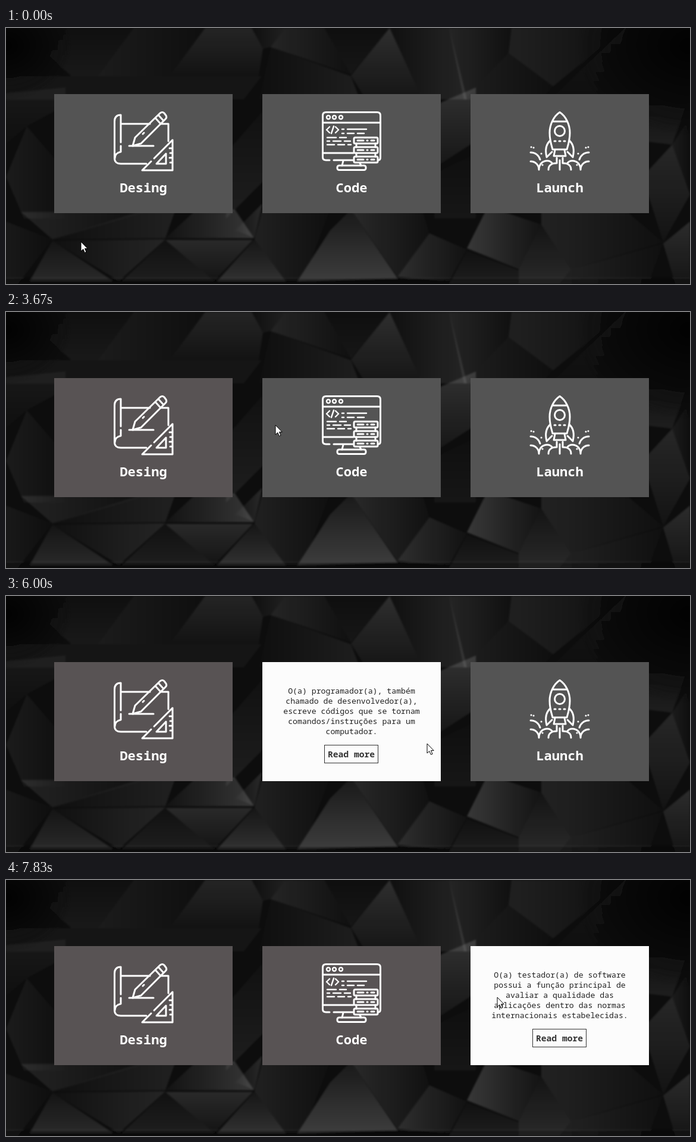
Recreate the animation shown at these times as an HTML page. Size 1150 by 430 pixels, loop 8 s.

```html
<!DOCTYPE html>
<html lang="pt">
<head>
<meta charset="utf-8">
<title>Cards</title>
<style>
html, body { margin: 0; width: 100%; height: 100%; overflow: hidden; background: #0d0d0d; }
svg { display: block; }
text { font-family: "Noto Sans Mono", "DejaVu Sans Mono", monospace; text-anchor: middle; white-space: pre; }
.title { font-size: 22px; font-weight: 700; fill: #fff; }
.line { font-size: 13.2px; fill: #222; }
.label { font-size: 14.67px; font-weight: 700; }
.icon { fill: none; stroke: #fff; stroke-width: 3; stroke-linejoin: round; stroke-linecap: round; }
</style>
</head>
<body>
<svg id="stage" width="1150" height="430" viewBox="0 0 1150 430">
  <defs>
    <linearGradient id="down" x2="0" y2="1"><stop stop-color="#fff"/><stop offset="1" stop-color="#fff" stop-opacity=".25"/></linearGradient>
    <linearGradient id="up" y1="1" x2="0" y2="0"><stop stop-color="#fff"/><stop offset="1" stop-color="#fff" stop-opacity=".25"/></linearGradient>
    <linearGradient id="right"><stop stop-color="#fff"/><stop offset="1" stop-color="#fff" stop-opacity=".15"/></linearGradient>
    <linearGradient id="left" x1="1" x2="0"><stop stop-color="#fff"/><stop offset="1" stop-color="#fff" stop-opacity=".15"/></linearGradient>
    <radialGradient id="shade"><stop stop-opacity=".85"/><stop offset="1" stop-opacity="0"/></radialGradient>
    <filter id="soft" x="0" y="0" width="1" height="1"><feGaussianBlur stdDeviation="1.5"/></filter>
    <g id="halfCloud">
      <path d="M1 69C9 69 15 74 17 81M1 84C9 84 15 90 15 98M15 98C15 89 21 83 29 83C33 83 36 85 38 88M31 98C31 91 36 87 45 87V78"/>
      <path d="M34 49C27 55 25 64 28 77L37 68M41 50h2M6 61h.1M2 60h.1M21 90h.1M19 71h.1"/>
    </g>
  </defs>

  <rect width="1150" height="430" fill="#0d0d0d"/>
  <g filter="url(#soft)">
    <path d="M22 0H215L155 81H110Z" fill="url(#up)" opacity=".05"/>
    <path d="M215 0H335L275 81H155Z" fill="url(#right)" opacity=".06"/>
    <path d="M335 0H413L432 35L425 81H275Z" fill="url(#down)" opacity=".1"/>
    <path d="M0 81H430L400 120H0Z" fill="#fff" opacity=".035"/>
    <path d="M413 0H470L445 32L432 35Z" fill="url(#left)" opacity=".08"/>
    <path d="M470 0H535L580 78L445 32Z" fill="url(#right)" opacity=".1"/>
    <path d="M445 32L580 81L595 120H425Z" fill="url(#left)" opacity=".07"/>
    <path d="M535 0H645L580 78Z" fill="url(#up)" opacity=".04"/>
    <path d="M645 0L580 80L605 120H700Z" fill="url(#down)" opacity=".14"/>
    <path d="M645 0H745L775 120H700Z" fill="url(#left)" opacity=".1"/>
    <path d="M745 0H850L845 42L770 120Z" fill="url(#right)" opacity=".1"/>
    <path d="M845 42L920 98L900 120H770Z" fill="url(#right)" opacity=".07"/>
    <path d="M850 0H1040L920 98L845 42Z" fill="url(#right)" opacity=".08"/>
    <path d="M1040 0H1110L1090 120H915Z" fill="url(#down)" opacity=".04"/>
    <path d="M0 110L100 100V130L35 165L0 195Z" fill="url(#down)" opacity=".05"/>
    <path d="M35 165L100 240V320H30L0 250Z" fill="url(#right)" opacity=".06"/>
    <path d="M370 210L440 130V250L370 320Z" fill="url(#up)" opacity=".07"/>
    <path d="M720 130L790 100V190L720 235Z" fill="url(#down)" opacity=".15"/>
    <path d="M720 245L790 210V320H720Z" fill="url(#up)" opacity=".04"/>
    <path d="M1070 111H1150L1120 196L1070 190Z" fill="url(#up)" opacity=".07"/>
    <path d="M1120 196L1150 280L1105 360L1070 250Z" fill="url(#down)" opacity=".11"/>
    <path d="M1120 196L1150 150V280Z" fill="url(#right)" opacity=".06"/>
    <path d="M25 309H235L78 355Z" fill="url(#right)" opacity=".09"/>
    <path d="M0 325L78 355L20 430H0Z" fill="url(#right)" opacity=".05"/>
    <path d="M78 357L180 425H40Z" fill="url(#up)" opacity=".12"/>
    <path d="M78 355L235 305H285L268 353Z" fill="url(#left)" opacity=".08"/>
    <path d="M78 357L268 355L190 425Z" fill="url(#left)" opacity=".1"/>
    <path d="M268 353L320 305H385L417 353Z" fill="url(#left)" opacity=".17"/>
    <path d="M268 356L415 356L350 425Z" fill="url(#down)" opacity=".12"/>
    <path d="M268 356L350 425H195Z" fill="url(#up)" opacity=".07"/>
    <path d="M385 340L431 295L418 352Z" fill="url(#left)" opacity=".12"/>
    <path d="M418 355L470 425H355Z" fill="url(#up)" opacity=".15"/>
    <path d="M418 355L431 305H545L515 385L490 425H470Z" fill="url(#right)" opacity=".08"/>
    <path d="M580 305L658 420L490 425L545 340Z" fill="url(#up)" opacity=".2"/>
    <path d="M580 305H700L712 345L658 418Z" fill="url(#right)" opacity=".12"/>
    <path d="M658 418L712 345L775 372L745 425Z" fill="url(#right)" opacity=".14"/>
    <path d="M775 370L810 300L900 330L862 405Z" fill="url(#right)" opacity=".18"/>
    <path d="M900 330L900 305H1040L1105 360L950 405Z" fill="url(#right)" opacity=".09"/>
    <path d="M900 330L950 405L930 430H862V405Z" fill="url(#up)" opacity=".12"/>
    <path d="M775 374L862 407V430H745Z" fill="url(#up)" opacity=".07"/>
    <path d="M950 405L1105 362L1080 430H930Z" fill="url(#right)" opacity=".09"/>
    <path d="M1105 362L1150 325V430H1125Z" fill="url(#down)" opacity=".13"/>
    <ellipse cx="1150" cy="30" rx="190" ry="150" fill="url(#shade)"/>
    <ellipse cx="0" cy="30" rx="110" ry="90" fill="url(#shade)"/>
    <rect y="420" width="1150" height="10" opacity=".25"/>
  </g>
  <g id="cards"></g>
  <g id="cursor" stroke="#000" stroke-linejoin="round">
    <path d="M0 0V16L3.8 12.6L6.4 18.4L9 17.3L6.5 11.6H11.2Z" fill="#fff"/>
    <path d="M-3 -7H-1L0 -6L1 -7H3M0 -6V6M-3 7H-1L0 6L1 7H3" fill="none"/>
    <path d="M0 1.5Q2 -1 3.5 1.5V8Q5 6.5 6.5 8.5Q8 7.5 9.3 9.3Q11.5 9 11.5 11.5V16Q11 20 9 22.5H1.5Q-1 19 -4 15Q-5 12 -2 12.5L0 14.5Z" fill="#fff"/>
  </g>
</svg>
<script>
const LOOP = 8000, STEP = 1000 / 6, FLIP = 500, TOP = 111;

const icons = [
  `<path d="M12 6C5 6 1.5 10 1.5 17V79C1.5 85 6 88 12 88H55M12 6V52M12 58V68C6 69 2 73 2 79M12 21H61M80 21H92V50M26 58H67"/>
   <path d="M32 58L36 44L78 3Q82 0 85 3L88 7Q90 10 87 13L46 54ZM70 11L79 21M75 6L84 16M49 38L51 36"/>
   <path d="M68 79L99 48V99H48L63 84M88 71V88H72ZM99 62H94M99 70H95M99 78H94M99 86H95"/>`,
  `<path d="M13 82H7Q1.5 82 1.5 77V7Q1.5 1.5 7 1.5H93Q98.5 1.5 98.5 7V77Q98.5 82 95 82M1.5 19H98.5M1.5 70H53M20 82H53M36 83L34 91M64 87L66 91"/>
   <rect x="26" y="91" width="48" height="7.5" rx="3"/>
   <g stroke-width="2.4"><circle cx="11" cy="10" r="3"/><circle cx="21" cy="10" r="3"/><circle cx="32" cy="10" r="3"/>
   <path d="M13 26L8 31L13 36M23 26L28 31L23 36M20 25L16 37M34 30H37M43 30H75M34 37H37M43 37H54M60 37H71M9 44H24M30 44H41M9 50H13M19 50H32M38 50H48M9 56H21M27 56H38M44 56H49"/></g>
   ${[44, 60, 76].map(y => `<rect x="54" y="${y}" width="40" height="10" rx="2"/><path d="M60 ${y + 5}H70M76 ${y + 5}H77M83 ${y + 5}H88"/>`).join("")}
   <path d="M58 54V60M90 54V60M58 70V76M90 70V76"/>`,
  `<path d="M50 1.5C40 8 33 22 33 36C33 48 36 57 38 64H62C64 57 67 48 67 36C67 22 60 8 50 1.5ZM38 17H62M42 65L40 75H60L58 65M49 50H51M50 82V98"/>
   <circle cx="50" cy="33" r="8.5"/>
   <use href="#halfCloud"/><use href="#halfCloud" transform="matrix(-1 0 0 1 100 0)"/>`
];

const cards = [
  { x: 81, title: "Desing", open: 817, close: 2833, first: 36, lines: [
    "O(a) Design pode ser", "compreendido como um processo,", "ou ciência, para solucionar um",
    "determinado problema — seja ele", "qual for — por meio da", "manipulação de atributos", "visuais."] },
  { x: 431, title: "Code", open: 3667, close: 6060, first: 53, lines: [
    "O(a) programador(a), também", "chamado de desenvolvedor(a),", "escreve códigos que se tornam",
    "comandos/instruções para um", "computador."] },
  { x: 781, title: "Launch", open: 6667, close: 9999, first: 53, lines: [
    "O(a) testador(a) de software", "possui a função principal de", "avaliar a qualidade das",
    "aplicações dentro das normas", "internacionais estabelecidas."] }
];

// time, x, y
const path = [
  [0, 126, 359], [500, 150, 345], [817, 195, 308], [1167, 238, 166], [1500, 225, 205], [1833, 290, 245],
  [2000, 300, 230], [2333, 223, 176], [2500, 162, 269], [2667, 162, 269], [2833, 346, 311], [3333, 415, 240],
  [3667, 453, 190], [4167, 540, 205], [4667, 600, 235], [5000, 578, 262], [5167, 570, 264], [5667, 580, 266],
  [6060, 731, 245], [6667, 785, 222], [7000, 900, 190], [7333, 1020, 185], [7500, 960, 215], [7833, 826, 197]
];

const $ = id => document.getElementById(id);
const mix = (a, b, k) => a + (b - a) * k;
const blend = (a, b, k) => `rgb(${a.map((v, i) => Math.round(mix(v, b[i], k)))})`;
const clamp = v => Math.min(1, Math.max(0, v));

// cubic-bezier(.25, .1, .25, 1)
function ease(x) {
  if (x < .01) return 0;
  if (x > .99) return 1;
  let lo = 0, hi = 1, s = x;
  for (let i = 0; i < 24; i++) {
    s = (lo + hi) / 2;
    const u = 1 - s;
    if (.75 * u * s * (u + s) + s ** 3 < x) lo = s; else hi = s;
  }
  return .3 * (1 - s) ** 2 * s + 3 * (1 - s) * s * s + s ** 3;
}

cards.forEach((c, n) => {
  c.button = c.first + 17 * c.lines.length + 1.5;
  $("cards").insertAdjacentHTML("beforeend", `<g>
    <g><rect width="300" height="200"/><g class="icon" transform="translate(100 29)">${icons[n]}</g>
      <text class="title" x="150" y="165">${c.title}</text></g>
    <g><rect width="300" height="200" fill="#fcfcfc"/>
      ${c.lines.map((s, i) => `<text class="line" x="150" y="${c.first + 17 * i}">${s}</text>`).join("")}
      <rect x="104.5" y="${c.button}" width="90" height="30" stroke="#333"/>
      <text class="label" x="149.5" y="${c.button + 20.5}">Read more</text></g></g>`);
  [c.front, c.back] = $("cards").lastElementChild.children;
  c.fill = c.front.querySelector("rect");
  c.box = c.back.querySelectorAll("rect")[1];
  c.label = c.back.querySelector(".label");
});

function place(face, x, mid, scale) {
  face.setAttribute("display", scale < .002 ? "none" : "inline");
  face.setAttribute("transform", `translate(${x} ${mid - 100 * scale}) scale(1 ${scale})`);
}

function pointer(t) {
  const i = path.findIndex(p => p[0] > t);
  if (i < 0) return path[path.length - 1].slice(1);
  const [a, b] = [path[i - 1], path[i]], k = (t - a[0]) / (b[0] - a[0]);
  return [mix(a[1], b[1], k), mix(a[2], b[2], k)];
}

function draw(t) {
  const [px, py] = pointer(t).map(Math.round);
  let shape = t > 1100 && t < 1600 ? 1 : 0;

  for (const c of cards) {
    const closing = t >= c.close;
    const p = ease(clamp((t - (closing ? c.close : c.open)) / FLIP));
    const q = closing ? 1 - p : p, turn = q * Math.PI / 2;
    const sin = Math.sin(turn), cos = Math.cos(turn);
    // the cube sags a little in the direction of its turn
    const sag = p > 0 && p < 1 ? (closing ? -2 : 2) : 0;
    const mid = TOP + 100 + sag;
    place(c.front, c.x, mid - 100 * sin, cos);
    place(c.back, c.x, mid + 100 * cos, sin);
    c.fill.setAttribute("fill", blend(closing ? [88, 83, 84] : [84, 84, 84], [255, 0, 87], q));

    const bx = px - c.x - 104, by = py - TOP - c.button;
    const hover = q > .9 && bx > 0 && bx < 91 && by > -1 && by < 31;
    c.box.setAttribute("fill", hover ? "#333" : "#fcfcfc");
    c.label.setAttribute("fill", hover ? "#fff" : "#333");
    if (hover) shape = 2;
  }

  const cursor = $("cursor");
  cursor.setAttribute("transform", `translate(${px} ${py})`);
  [...cursor.children].forEach((el, i) => el.setAttribute("display", i === shape ? "inline" : "none"));
}

const start = performance.now();
function tick() {
  const t = (performance.now() - start) % LOOP;
  draw(Math.floor((t + 7) / STEP) % 48 * STEP + .5);
  requestAnimationFrame(tick);
}
tick();
</script>
</body>
</html>
```
